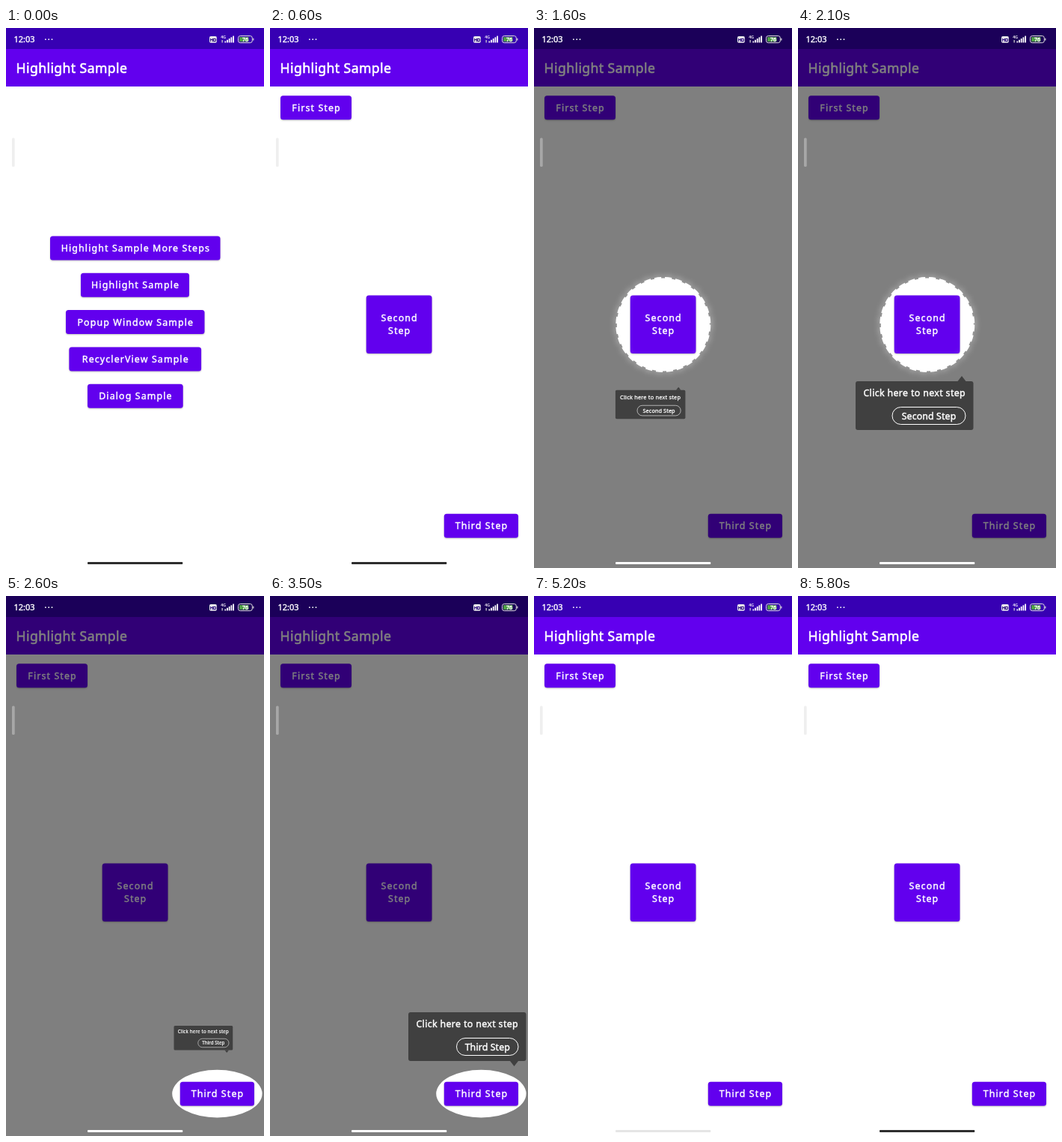
Write an HTML page with a canvas that moves like this. It is 345 px wide and 720 px high and loops after 5900 ms.

```html
<!DOCTYPE html>
<html lang="en">
<head>
<meta charset="utf-8">
<title>Highlight Sample</title>
<style>
html, body { margin: 0; width: 100%; height: 100%; overflow: hidden; background: #fff; }
canvas { display: block; }
</style>
</head>
<body>
<canvas id="stage" width="345" height="720"></canvas>
<script>
const W = 345, H = 720, LOOP = 5900, TICK = 100;
const g = document.getElementById('stage').getContext('2d');
const FAMILY = '"Noto Sans", "Open Sans", sans-serif';
const PURPLE = '#6200ee', TAU = Math.PI * 2;

const clamp = v => Math.max(0, Math.min(1, v));
const easeOut = u => 1 - (1 - u) ** 3;
const easeInOut = u => (1 - Math.cos(Math.PI * u)) / 2;

// A thin outline gives the regular face a medium weight.
function text(str, x, y, size, { spacing = 0, align = 'left', color = '#fff', bold = 0.035 } = {}) {
  g.font = `400 ${size}px ${FAMILY}`;
  g.letterSpacing = spacing + 'px';
  g.textAlign = align;
  g.fillStyle = g.strokeStyle = color;
  g.lineWidth = size * bold;
  g.lineJoin = 'round';
  const left = x + (align === 'center' ? spacing / 2 : 0);
  g.fillText(str, left, y);
  g.strokeText(str, left, y);
}

function box(x, y, w, h, r, color) {
  g.beginPath();
  g.roundRect(x, y, w, h, r);
  g.fillStyle = color;
  g.fill();
}

function button(x, y, w, h, ...lines) {
  g.save();
  g.shadowColor = 'rgba(0,0,0,.25)';
  g.shadowBlur = 2;
  g.shadowOffsetY = 1;
  box(x, y, w, h, 3.5, PURPLE);
  g.restore();
  const top = y + h / 2 + 4.6 - (lines.length - 1) * 8.5;
  lines.forEach((line, i) =>
    text(line, x + w / 2, top + i * 17, 12.4, { spacing: 1.12, align: 'center' }));
}

function page(x, content) {
  g.save();
  g.translate(x, 0);
  box(0, 0, W, H, 0, '#fff');
  box(0, 0, W, 78, 0, PURPLE);
  box(0, 0, W, 28, 0, '#3700b3');
  text('Highlight Sample', 13.6, 60, 17.6, { spacing: 0.4 });
  content();
  g.restore();
}

function menu() {
  button(59, 277.4, 227.5, 32, 'Highlight Sample More Steps');
  button(100, 326.7, 145, 32, 'Highlight Sample');
  button(80, 376, 185.5, 32, 'Popup Window Sample');
  button(84.4, 425.4, 176.7, 32, 'RecyclerView Sample');
  button(109, 474.7, 127.7, 32, 'Dialog Sample');
}

function steps() {
  button(14, 90.3, 95, 32, 'First Step');
  button(128.7, 356.6, 87.8, 77.4, 'Second', 'Step');
  button(232.8, 647.7, 99.2, 32, 'Third Step');
}

// body: top left of the tip box; arrow: three points; (cx, cy): centre of the scaling
const guides = [
  { from: 770, to: 1320, label: 'First Step', pill: 82, body: [130, 85],
    arrow: [[130, 95], [123, 100.5], [130, 106]], cx: 205, cy: 117.5,
    hole: () => g.roundRect(7, 85, 109, 42.5, 3.5) },
  { from: 1320, to: 2350, label: 'Second Step', pill: 98, body: [77, 471],
    arrow: [[213.5, 471], [219, 464], [224.5, 471]], cx: 155.5, cy: 500,
    hole: () => g.arc(172.8, 395.5, 62, 0, TAU), dashed: true },
  { from: 2350, to: 4300, label: 'Third Step', pill: 82.5, body: [185, 555],
    arrow: [[321, 620], [326.5, 627], [332, 620]], cx: 264, cy: 591,
    hole: () => g.ellipse(282.4, 663.6, 60.2, 31.8, 0, 0, TAU) }
];

function tip({ from, label, pill, body: [x, y], arrow, cx, cy }, t) {
  const s = easeInOut(clamp((t - from) / 500));
  g.save();
  g.translate(cx, cy);
  g.scale(s, s);
  g.translate(-cx, -cy);
  box(x, y, 157.5, 65, 3, '#404040');
  g.beginPath();
  arrow.forEach(p => g.lineTo(...p));
  g.fill();
  text('Click here to next step', x + 10.4, y + 20, 12.4, { spacing: 0.35 });
  g.beginPath();
  g.roundRect(x + 147 - pill, y + 34.5, pill, 23, 11.5);
  g.strokeStyle = '#fff';
  g.lineWidth = 1;
  g.stroke();
  text(label, x + 147 - pill / 2, y + 50.6, 12.4, { align: 'center', spacing: 0.1 });
  g.restore();
}

function overlay(guide, t) {
  g.beginPath();
  g.rect(0, 0, W, H);
  g.closePath();
  const start = guide.dashed ? [234.8, 395.5] : [0, 0];
  g.moveTo(...start);
  guide.hole();
  g.fillStyle = 'rgba(0,0,0,.5)';
  g.fill('evenodd');
  if (guide.dashed) {
    g.save();
    g.beginPath();
    guide.hole();
    g.setLineDash([9, 5]);
    g.lineWidth = 3;
    g.strokeStyle = g.shadowColor = '#fff';
    g.shadowBlur = 9;
    g.stroke();
    g.restore();
  }
  tip(guide, t);
}

function statusBar() {
  text('12:03', 10.5, 19, 11);
  for (let i = 0; i < 3; i++) box(52 + i * 4.3, 14.3, 1.8, 1.8, 0.9, '#fff');
  box(272, 11, 9.8, 8.8, 1.8, '#eee');
  text('HD', 276.9, 17.7, 5.8, { align: 'center', color: '#2b0a80', bold: 0.08 });
  text('4G', 287.3, 14.2, 5.2);
  box(288.5, 16, 1.3, 3.5, 0, '#ccc');
  for (let i = 0; i < 5; i++) box(292.4 + i * 2.7, 17.4 - i * 1.75, 1.8, 2.2 + i * 1.75, 0.4, '#fff');
  g.beginPath();
  g.roundRect(310.5, 10.5, 18.8, 9.2, 2.8);
  g.strokeStyle = '#ddd';
  g.lineWidth = 1;
  g.stroke();
  box(312, 12, 12.5, 6.2, 1.3, '#50a048');
  box(330.2, 13.5, 1.2, 3.2, 0.6, '#ddd');
  text('76', 320, 17.7, 7, { align: 'center', bold: 0.06 });
}

function navBar(t) {
  const light = clamp((t - 1150) / 300) - clamp((t - 5150) / 400);
  const v = Math.round(46 + 209 * light);
  box(109, 712, 127.3, 3, 1, `rgb(${v},${v},${v})`);
}

function draw(t) {
  const slide = easeOut(clamp((t - 50) / 450));
  if (slide < 1) page(-W * 0.25 * slide, menu);
  if (slide > 0) page(W * (1 - slide), steps);
  const guide = guides.find(s => t >= s.from && t < s.to);
  if (guide) overlay(guide, t);
  statusBar();
  box(8, 146.5, 3.7, 38.5, 1.5, 'rgba(218,218,218,.44)');
  navBar(t);
}

const begin = performance.now();
function frame() {
  const t = (performance.now() - begin) % LOOP;
  draw(Math.floor(t / TICK) * TICK);
  requestAnimationFrame(frame);
}
frame();
</script>
</body>
</html>
```
